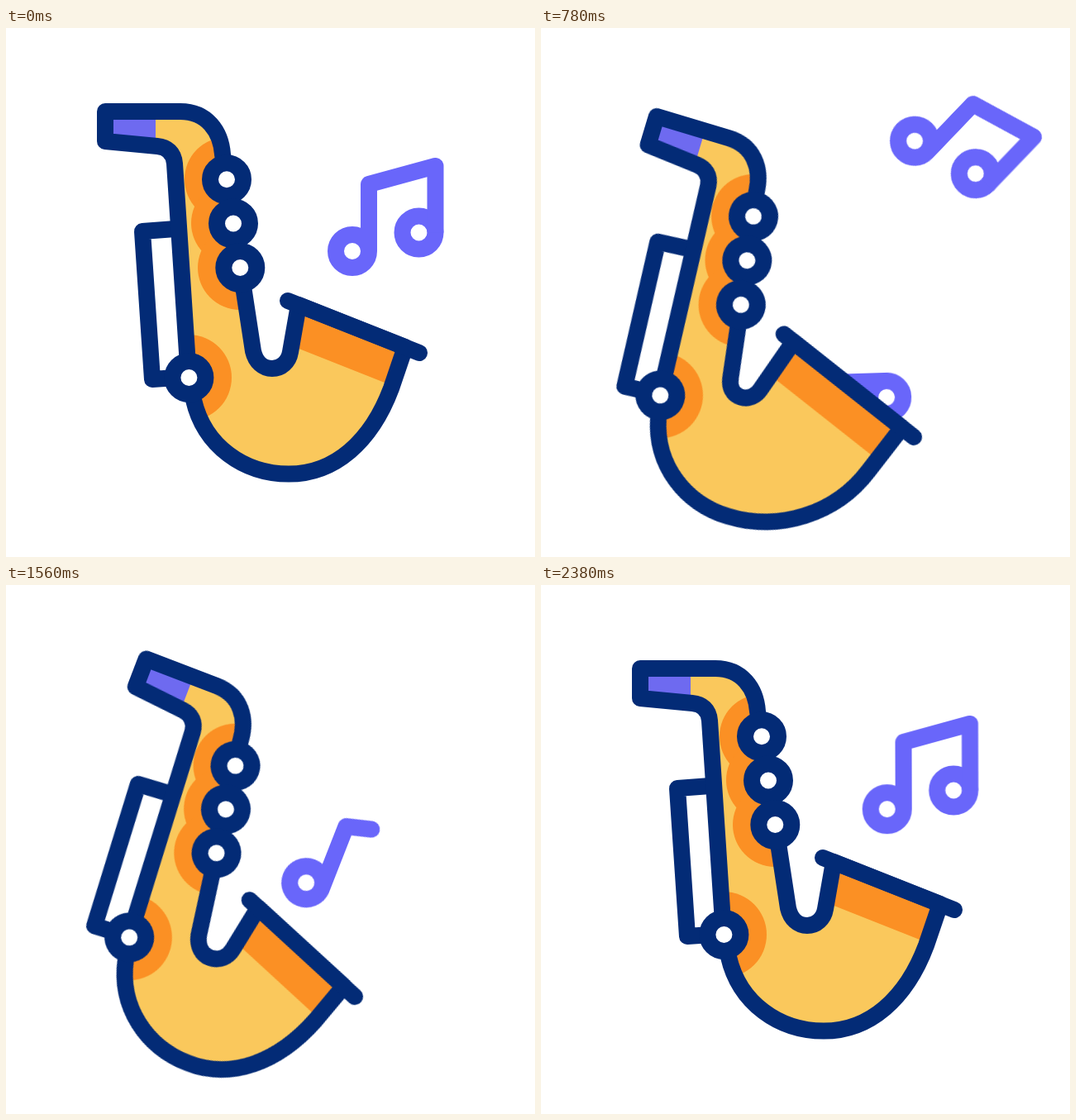
These frames come from a looping animation (640 by 640 pixels, 2400 ms). An HTML page without scripts:

```html
<!DOCTYPE html>
<html lang="en">
<head>
<meta charset="utf-8">
<title>Saxophone</title>
<style>
  :root {
    --navy: #032b76;
    --gold: #fac85c;
    --orange: #fb9024;
    --violet: #6966fa;
    --body-rest: path("M120 101H211C243 101 260 125 262 153L288 319L299 391C302 404 311 412 322 412C333 412 342 404 344 392L354 335L483 386L466 436C442 500 398 539.6 342 539.6C288 539.6 240 506 227 450L221 423L204 164C203 151 195 144 183 143L120 137Z");
    --body-wide: path("M120 101H211C243 101 260 125 262 153L288 319L296.8 379C298.7 390 305.5 397 315.4 397C324 397 332 391 335 382L357 314.5L512.7 376.3L489 438C466 500 406 539.6 342 539.6C288 539.6 240 506 227 450L221 423L204 164C203 151 195 144 183 143L120 137Z");
    --bell-rest: path("M341 330L500 393");
    --bell-wide: path("M343.2 309L529.7 383");
  }
  html, body { margin: 0; width: 100%; height: 100%; overflow: hidden; background: #fff; }
  svg { display: block; width: 100vw; height: 100vh; }
  path, circle { fill: none; stroke-width: 20; stroke-linejoin: round; }

  .body, .bell, .sax, .note { animation: 2400ms linear infinite; }
  .body { d: var(--body-rest); animation-name: body; }
  .bell { d: var(--bell-rest); animation-name: bell; }
  .sax { transform-origin: 320px 320px; animation-name: sway; }
  .line, .key { stroke: var(--navy); stroke-linecap: round; }
  .key { fill: #fff; }
  .gold { fill: var(--gold); }
  .glow circle { fill: var(--orange); }
  .band { stroke: var(--orange); stroke-width: 98; }
  .tip { fill: #6e6af0; }
  .note { stroke: var(--violet); }
  .quarter { animation-name: quarter; }
  .eighth { animation-name: eighth; }
  .pair { animation-name: pair; }
  .quarter, .eighth { stroke-linecap: round; }

  @keyframes body {
    0%, 8.33% { d: var(--body-rest); animation-timing-function: cubic-bezier(.3, 0, .6, 1); }
    32.1% { d: var(--body-wide); animation-timing-function: ease-in-out; }
    41.2% { d: var(--body-rest); animation-timing-function: cubic-bezier(.35, .25, .6, 1); }
    53.5% { d: var(--body-wide); animation-timing-function: ease-in-out; }
    67.5% { d: var(--body-rest); animation-timing-function: ease-in-out; }
    85.8% { d: var(--body-wide); animation-timing-function: ease-in-out; }
    98.8%, 100% { d: var(--body-rest); }
  }
  @keyframes bell {
    0%, 8.33% { d: var(--bell-rest); animation-timing-function: cubic-bezier(.3, 0, .6, 1); }
    32.1% { d: var(--bell-wide); animation-timing-function: ease-in-out; }
    41.2% { d: var(--bell-rest); animation-timing-function: cubic-bezier(.35, .25, .6, 1); }
    53.5% { d: var(--bell-wide); animation-timing-function: ease-in-out; }
    67.5% { d: var(--bell-rest); animation-timing-function: ease-in-out; }
    85.8% { d: var(--bell-wide); animation-timing-function: ease-in-out; }
    98.8%, 100% { d: var(--bell-rest); }
  }
  @keyframes sway {
    0%, 8.33% { transform: translate(0, 0) rotate(0deg); animation-timing-function: ease-in; }
    16.67% { transform: translate(-14px, 15px) rotate(3.6deg); }
    24.17% { transform: translate(-35.5px, 38px) rotate(10.1deg); animation-timing-function: ease-out; }
    32.5% { transform: translate(-51.6px, 54.2px) rotate(16.7deg); }
    39.17% { transform: translate(-51px, 54px) rotate(20.3deg); }
    45.83% { transform: translate(-54.6px, 58.9px) rotate(23deg); animation-timing-function: ease-out; }
    54.17% { transform: translate(-60.5px, 67px) rotate(24.5deg); animation-timing-function: ease-in; }
    59.58% { transform: translate(-54px, 59px) rotate(23.7deg); }
    65% { transform: translate(-42px, 45.6px) rotate(21deg); }
    70.83% { transform: translate(-25px, 27px) rotate(14deg); }
    76.67% { transform: translate(-12px, 13px) rotate(6deg); animation-timing-function: ease-out; }
    83%, 100% { transform: translate(0, 0) rotate(0deg); }
  }
  @keyframes quarter {
    0%, 28.3% { transform: translate(385px, 490px) rotate(-105deg); opacity: 0; }
    28.34% { transform: translate(385px, 490px) rotate(-105deg); opacity: 1; }
    32.5% { transform: translate(418px, 447px) rotate(-92deg); }
    45.83% { transform: translate(471px, 390px) rotate(-31.3deg); }
    58.5% { opacity: 1; }
    60.8% { transform: translate(520px, 318px) rotate(15deg); opacity: 0; }
    100% { transform: translate(520px, 318px) rotate(15deg); opacity: 0; }
  }
  @keyframes eighth {
    0%, 53.3% { transform: translate(305px, 540px) rotate(-25deg); opacity: 0; }
    53.34% { transform: translate(305px, 540px) rotate(-25deg); opacity: 1; animation-timing-function: cubic-bezier(.3, .4, .7, .9); }
    65% { transform: translate(363px, 360.5px) rotate(21.3deg); }
    75% { opacity: 1; }
    77.5% { transform: translate(420px, 275px) rotate(55deg); opacity: 0; }
    100% { transform: translate(420px, 275px) rotate(55deg); opacity: 0; }
  }
  @keyframes pair {
    0%, 8.33% { transform: translate(419px, 270px) rotate(0deg); animation-timing-function: cubic-bezier(.4, .1, .8, .8); }
    24.17% { transform: translate(434px, 195.5px) rotate(25.6deg); }
    32.5% { transform: translate(452px, 137px) rotate(43.7deg); }
    34% { opacity: 1; }
    36.5% { transform: translate(461px, 109px) rotate(51deg); opacity: 0; }
    36.54%, 79.1% { transform: translate(362px, 521px) rotate(-25deg); opacity: 0; }
    79.17% { transform: translate(362px, 521px) rotate(-25deg); opacity: 1; }
    83.33% { transform: translate(384.3px, 421.3px) rotate(-20deg); animation-timing-function: cubic-bezier(.25, .5, .65, .96); }
    100% { transform: translate(419px, 270px) rotate(0deg); opacity: 1; }
  }
</style>
</head>
<body>
<svg viewBox="0 0 640 640">
  <defs>
    <clipPath id="inside"><path class="body"/></clipPath>
  </defs>

  <g class="note quarter">
    <circle r="20"/>
    <path d="M20 0V-81"/>
  </g>
  <g class="note eighth">
    <circle r="20"/>
    <path d="M20 0V-81L50 -89"/>
  </g>
  <g class="note pair">
    <circle r="20"/>
    <circle cx="80.5" cy="-22.5" r="20"/>
    <path d="M20 0V-81L100.5 -103V-22.5"/>
  </g>

  <g class="sax">
    <path class="body gold"/>
    <g class="glow" clip-path="url(#inside)">
      <circle cx="267" cy="183" r="51"/>
      <circle cx="275" cy="236" r="51"/>
      <circle cx="283" cy="290" r="51"/>
      <circle cx="221" cy="423" r="52"/>
      <path class="bell band"/>
    </g>
    <path class="tip" d="M120 101H181V143L120 137Z"/>
    <path class="line" d="M205 243L165 246L177 425L221 422"/>
    <path class="body line"/>
    <path class="bell line"/>
    <circle class="key" cx="267" cy="183.3" r="20"/>
    <circle class="key" cx="275" cy="236.5" r="20"/>
    <circle class="key" cx="283.3" cy="290" r="20"/>
    <circle class="key" cx="221.4" cy="423" r="20"/>
  </g>
</svg>
</body>
</html>
```
